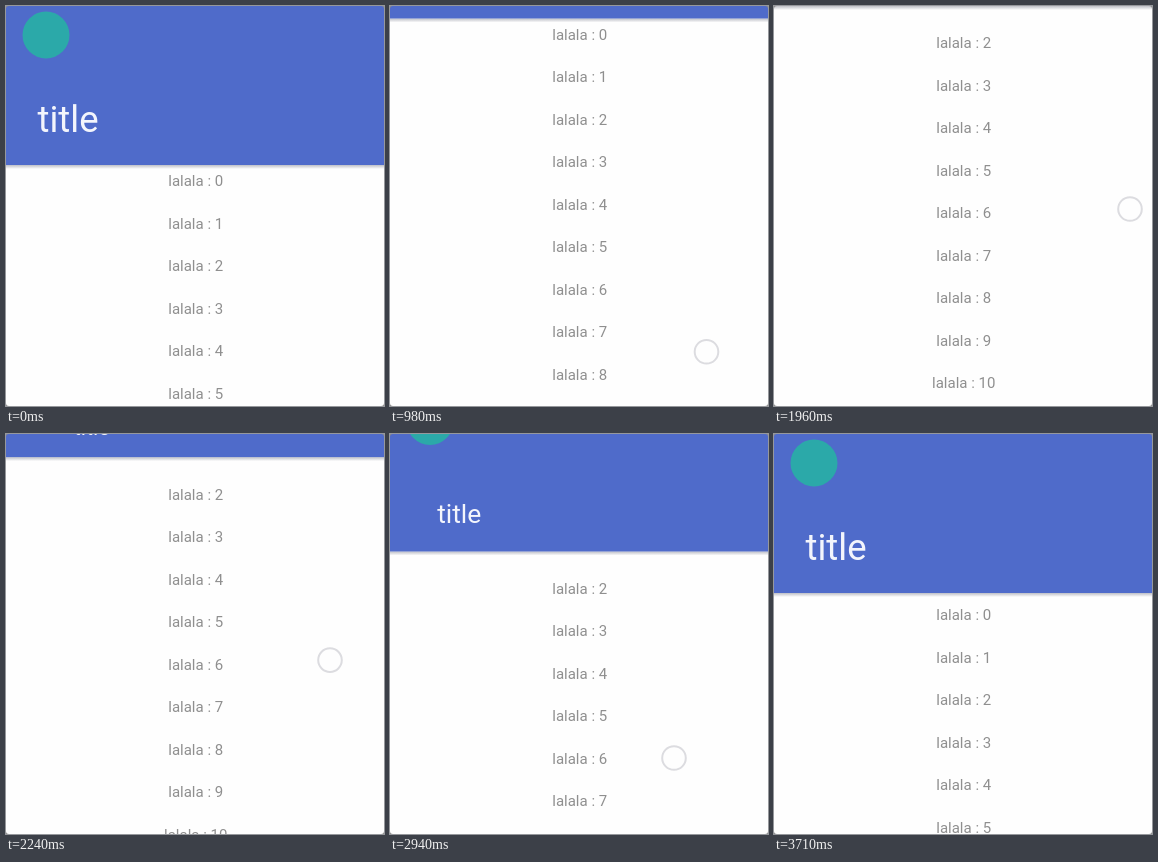
Recreate the animation shown at these times as an HTML page with a canvas. Size 378 by 400 pixels, loop 4690 ms.

```html
<!DOCTYPE html>
<html lang="en">
<head>
<meta charset="utf-8">
<title>Collapsing header</title>
<style>
  html, body { margin: 0; width: 100%; height: 100%; overflow: hidden; background: #8a8a8a; }
  canvas { display: block; border-radius: 3px; }
</style>
</head>
<body>
<canvas id="stage" width="378" height="400"></canvas>
<script>
const ctx = document.getElementById('stage').getContext('2d');
const LOOP = 4690, STEP = 70, LAST = 3710;
const EXPANDED = 159, COLLAPSED = 63, ROW = 42.5;

// time, y of the first row, touch x, touch y
const KEYS = [
  [0, 175, 264, 496],
  [630, 79, 288, 400],
  [1330, -22, 345, 291.5],
  [1540, -48, 351, 266],
  [1959, -48, 351, 266],
  [1960, -48, 356, 203],
  [2275, -22, 320, 229],
  [2590, 18, 297.5, 271],
  [2940, 69.5, 284, 324],
  [LAST, 181, 270, 436]
];

const clamp = (v, lo, hi) => Math.min(hi, Math.max(lo, v));
const mix = (a, b, k) => a + (b - a) * k;

function pose(t) {
  const i = clamp(KEYS.findIndex(key => key[0] > t), -1, KEYS.length);
  if (i < 0) return KEYS[KEYS.length - 1];
  const a = KEYS[i - 1], b = KEYS[i];
  const k = (t - a[0]) / (b[0] - a[0]);
  return a.map((v, n) => mix(v, b[n], k));
}

function text(str, x, y, size, color, align) {
  ctx.font = `${size}px Roboto, sans-serif`;
  ctx.fillStyle = color;
  ctx.textAlign = align;
  ctx.fillText(str, x, y);
}

function circle(x, y, r) {
  ctx.beginPath();
  ctx.arc(x, y, r, 0, Math.PI * 2);
}

function drawList(top) {
  for (let i = 0; i < 13; i++) {
    text(`lalala : ${i}`, 189.7, top + i * ROW + 5.4, 15, '#8f8f8f', 'center');
  }
}

function drawHeader(bottom) {
  const shadow = ctx.createLinearGradient(0, bottom, 0, bottom + 4);
  shadow.addColorStop(0, 'rgba(40,45,70,.3)');
  shadow.addColorStop(1, 'rgba(40,45,70,0)');
  ctx.fillStyle = shadow;
  ctx.fillRect(0, bottom, 378, 4);
  if (bottom <= 0) return;

  ctx.fillStyle = '#4f6bca';
  ctx.fillRect(0, 0, 378, bottom);

  circle(40, bottom - 130, 23.5);
  ctx.fillStyle = '#2ba9a9';
  ctx.fill();

  // Position shrinks linearly, text size decelerates
  const f = clamp((EXPANDED - bottom) / (EXPANDED - COLLAPSED), 0, 1);
  const size = mix(36.6, 21.6, 1 - (1 - f) ** 2);
  text('title', mix(31.5, 67.7, f), bottom - mix(33, 22, f), size, '#f3f5fc', 'left');
}

function drawTouch(x, y, alpha) {
  ctx.globalAlpha = alpha;
  circle(x, y, 11.8);
  ctx.strokeStyle = '#dcdce0';
  ctx.lineWidth = 2;
  ctx.stroke();
  ctx.globalAlpha = 1;
}

function draw(now) {
  const t = Math.min(LAST, Math.floor((now % LOOP) / STEP) * STEP);
  const [, top, touchX, touchY] = pose(t);
  const pullingDown = t >= 1960;
  const bottom = clamp(top + (pullingDown ? 48 : -16), 0, EXPANDED);

  ctx.fillStyle = '#fefefe';
  ctx.fillRect(0, 0, 378, 400);
  drawList(top);
  drawHeader(bottom);
  drawTouch(touchX, touchY, pullingDown ? 1 : clamp((1610 - t) / 70, 0, 1));
}

const start = performance.now();
function tick() {
  draw(performance.now() - start);
  requestAnimationFrame(tick);
}
tick();
</script>
</body>
</html>
```
